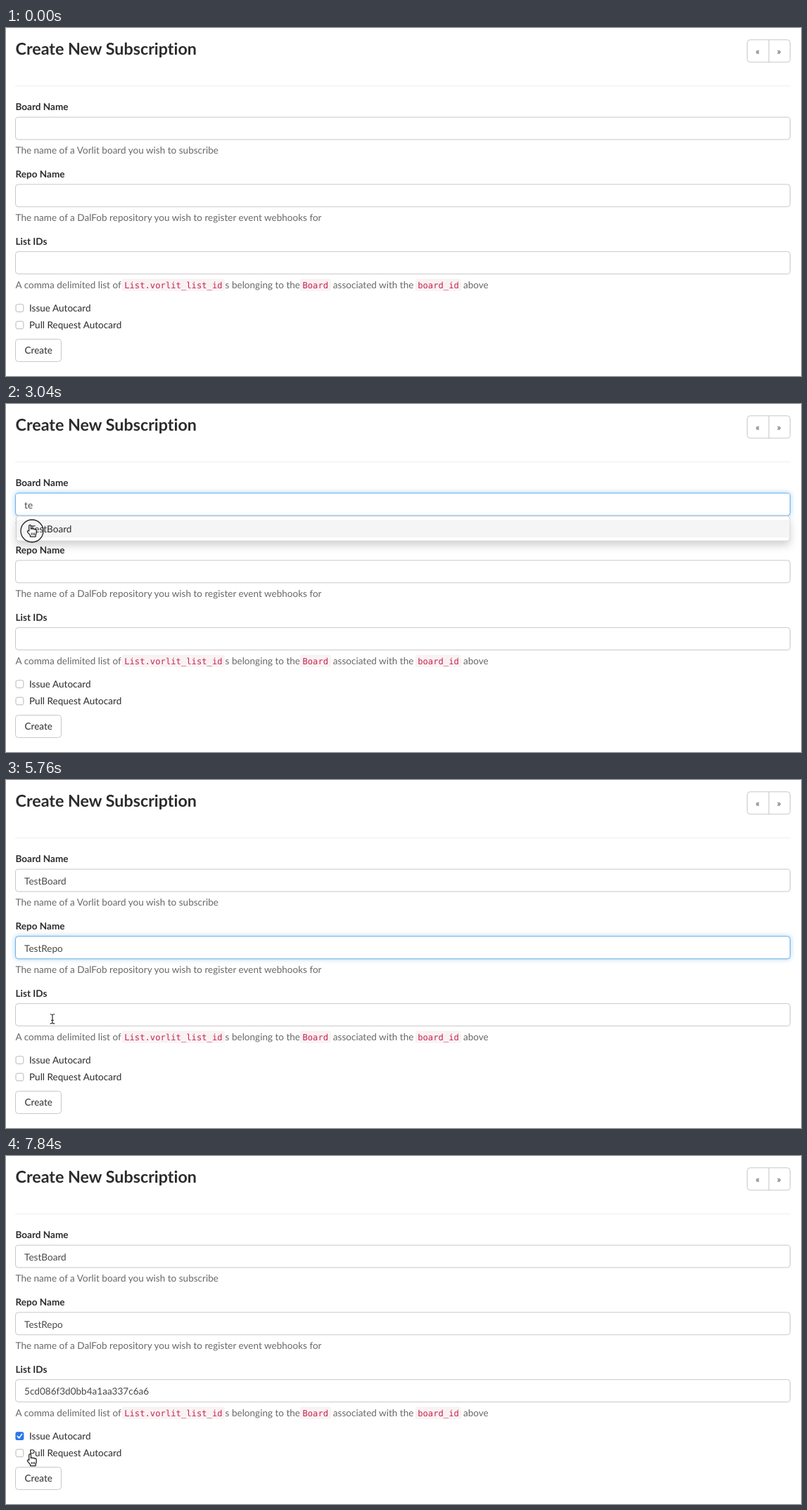
An HTML page for the animation above (8000 ms loop, 1130 by 496 pixels).

```html
<!DOCTYPE html>
<html lang="en">
<head>
<meta charset="utf-8">
<title>Create New Subscription</title>
<style>
  html, body { margin: 0; width: 100%; height: 100%; overflow: hidden; background: #fff; }
  svg { display: block; width: 100vw; height: 100vh; }
  text {
    font: 13.55px Lato, sans-serif; fill: #2c2c2c; white-space: pre;
    text-rendering: geometricPrecision; font-variant-ligatures: none;
  }
  .title { font-size: 23.3px; font-weight: 700; }
  .label { font-weight: 700; }
  .help { fill: #686868; }
  .value, .page { fill: #484848; }
  .page, .button { text-anchor: middle; }
  .code { font: 12.2px "DejaVu Sans Mono", monospace; fill: #c7254e; }
  .suggestion { font: 600 12.4px Inter, sans-serif; fill: #ececec; }
  .box { fill: #fff; stroke: #c6c6c6; stroke-width: .97; }
  .focused { stroke: #66afe9; }
</style>
</head>
<body>
<svg id="stage" viewBox="0 0 1130 496" xmlns="http://www.w3.org/2000/svg"></svg>
<script>
const LOOP = 8000, STEP = 160;
const LEFT = 13.5, WIDTH = 1101, TEXT_X = 26.1;
const FIELD_H = 31.9, FIELD_GAP = 95.8;
const LIST_ID = "5cd086f3d0bb4a1aa337c6a6";

const fieldY = i => 127.1 + i * FIELD_GAP;
const text = (cls, x, y, s, id = "") =>
  `<text class="${cls}" x="${x}" y="${y}" ${id && `id="${id}"`}>${s}</text>`;
const box = (x, y, w, h, r = 4, id = "") =>
  `<rect class="box" x="${x}" y="${y}" width="${w}" height="${h}" rx="${r}" ${id && `id="${id}"`}/>`;
const code = (x, w, s) =>
  `<rect x="${x}" y="357.2" width="${w}" height="17.6" rx="3.9" fill="#f9f2f4"/>` +
  text("code", x + 3.6, 370.6, s);

const fields = [
  { label: "Board Name", help: "The name of a Vorlit board you wish to subscribe" },
  { label: "Repo Name", help: "The name of a DalFob repository you wish to register event webhooks for" },
  { label: "List IDs", help: "A comma delimited list of" }
];

function fieldMarkup({ label, help }, i) {
  const y = fieldY(i);
  return `<rect id="glow${i}" x="13" y="${y - .5}" width="1102" height="32.9" rx="4"
      fill="#66afe9" fill-opacity=".6" filter="url(#glow)"/>` +
    text("label", LEFT, y - 9.9, label) +
    box(LEFT, y, WIDTH, FIELD_H, 4, "field" + i) +
    text("value", TEXT_X, y + 21.6, "", "value" + i) +
    text("help", LEFT, y + 51.8, help);
}

const checkbox = (y, label) =>
  `<rect x="14" y="${y}" width="10.8" height="10.8" rx="2.4" fill="#fff" stroke="#b8b8b8"/>` +
  text("", 33, y + 10.4, label);

const menu = (i, item) => `<g id="menu${i}" transform="translate(0 ${i * FIELD_GAP})">
  <rect x="14.5" y="159.8" width="1099.5" height="35.4" rx="3.5" fill="#fff"
    stroke="#ccc" stroke-width=".97" filter="url(#menuShadow)"/>
  <rect x="15" y="165" width="1098.5" height="25.4" fill="#f5f5f5"/>
  ${text("", 33.9, 182.8, item)}</g>`;

const beam = "M-3.3-6.8q2.6 0 3.3 1.3q.7-1.3 3.3-1.3M0-5.5V5.5M-3.3 6.8q2.6 0 3.3-1.3q.7 1.3 3.3 1.3M-1.9 2h3.8";
const hand = "M-4-6.5c0-2 2.6-2 2.6 0v4c.2-1.2 2.4-1.2 2.6.2 .5-1 2.3-.8 2.5.5 .6-.8 2-.5 2 1v3" +
  "c0 1.5-1 2.5-1 4V7.5h-7V6c-1-1.5-2.6-3-3.6-4.6-.8-1.3.8-2.6 2-1.4z";

const stage = document.getElementById("stage");
stage.innerHTML = `
<defs>
  <filter id="glow" x="-2%" y="-60%" width="104%" height="220%"><feGaussianBlur stdDeviation="3.9"/></filter>
  <filter id="menuShadow" x="-3%" y="-60%" width="106%" height="260%">
    <feDropShadow dx="0" dy="5.8" stdDeviation="5.8" flood-opacity=".175"/></filter>
  <filter id="popupShadow" x="-5%" y="-20%" width="110%" height="150%">
    <feDropShadow dx="0" dy="1" stdDeviation="1.4" flood-opacity=".45"/></filter>
</defs>
<rect width="1130" height="496" fill="#fff"/>
${text("title", LEFT, 37.7, "Create New Subscription")}
${box(1053.5, 16.8, 61, 31.9)}
<path d="M1084.3 17V48.5" stroke="#c6c6c6" stroke-width=".97"/>
${text("page", 1068.5, 37.5, "«")}${text("page", 1098.7, 37.5, "»")}
<path d="M13 82.5H1115" stroke="#eee"/>
${fields.map(fieldMarkup).join("")}
${code(164.6, 146.8, "List.vorlit_list_id")}
${text("help", 311.6, 370.7, "s belonging to the")}
${code(417.8, 44, "Board")}
${text("help", 464.8, 370.7, "associated with the")}
${code(581.6, 65.8, "board_id")}
${text("help", 650, 370.7, "above")}
${checkbox(393.8, "Issue Autocard")}
${checkbox(418, "Pull Request Autocard")}
<g id="check">
  <rect x="13.5" y="393.3" width="11.8" height="11.8" rx="2.6" fill="#2878ee"/>
  <path d="M16.3 399.4l2.3 2.6 4-5.6" fill="none" stroke="#fff" stroke-width="1.6"
    stroke-linecap="round" stroke-linejoin="round"/>
</g>
${box(LEFT, 443.5, 65, 31.9)}
${text("button", 46.2, 464, "Create")}
<path id="caret" d="M0-16.5V0" stroke="#333"/>
${menu(0, "TestBoard")}${menu(1, "TestRepo")}
<g id="popup">
  <rect x="13.5" y="352" width="231.5" height="50.5" rx="3" fill="#25272a" filter="url(#popupShadow)"/>
  ${text("suggestion", 25.5, 382, LIST_ID)}
</g>
<g id="cursor" fill="none">
  <circle id="ring" r="16" stroke="#222" stroke-width="1.3"/>
  <g id="beam"><path d="${beam}" stroke="#fff" stroke-width="2.6" stroke-opacity=".8"/>
    <path d="${beam}" stroke="#222" stroke-width="1.15"/></g>
  <g id="hand" transform="scale(1.08)">
    <path d="${hand}" fill="#fff" stroke="#222" stroke-width="1.2" stroke-linejoin="round"/>
    <path d="M-.5 2.4v3M1.5 2.4v3M3.3 2.4v3" stroke="#222" stroke-width=".9"/></g>
</g>`;

const $ = id => document.getElementById(id);
const show = (id, on) => $(id).setAttribute("visibility", on ? "visible" : "hidden");
const within = (t, ...spans) => spans.some(([a, b]) => t >= a && t < b);

// [time, x, y]
const path = [
  [160, 89, 188], [800, 39, 136], [960, 39, 136], [1120, 31, 139.5],
  [2400, 31, 139.5], [2880, 37, 181], [3200, 37, 181], [3840, 46, 250.3],
  [4480, 46, 250.3], [4800, 50, 274], [5120, 50, 274], [5760, 66, 340.5],
  [6720, 66, 340.5], [7200, 38, 404], [7520, 38, 404], [7840, 37, 433.5]
];

// [time, text]
const typing = [
  [[1920, "t"], [2240, "te"], [3200, "TestBoard"]],
  [[4160, "te"], [4320, "tes"], [5120, "TestRepo"]],
  [[6560, LIST_ID]]
];

const focusSpans = [[1280, 3840], [3840, 6080], [6080, 7360]];

function cursorAt(t) {
  const n = path.findIndex(p => p[0] > t);
  if (n < 0) return path[path.length - 1].slice(1);
  if (n === 0) return path[0].slice(1);
  const [t0, x0, y0] = path[n - 1], [t1, x1, y1] = path[n];
  const u = (t - t0) / (t1 - t0), e = u * u * (3 - 2 * u);
  return [x0 + (x1 - x0) * e, y0 + (y1 - y0) * e];
}

function render(now) {
  const t = Math.floor((now % LOOP) / STEP) * STEP;

  typing.forEach((keys, i) => {
    const value = keys.reduce((s, [at, v]) => t >= at ? v : s, "");
    const focused = within(t, focusSpans[i]);
    $("value" + i).textContent = value;
    $("field" + i).classList.toggle("focused", focused);
    show("glow" + i, focused);
    if (focused) {
      const x = TEXT_X + .4 + (value ? $("value" + i).getComputedTextLength() : 0);
      $("caret").setAttribute("transform", `translate(${x} ${fieldY(i) + 24.9})`);
    }
  });

  show("caret", within(t, [1440, 1760], [1920, 2560], [3840, 4640], [6080, 6400]));
  show("menu0", within(t, [2400, 3200]));
  show("menu1", within(t, [4480, 5120]));
  show("popup", within(t, [6080, 6560]));
  show("check", t >= 7520);

  const [x, y] = cursorAt(t);
  const visible = t >= 160;
  const pointing = within(t, [2720, 3200], [4640, 5120], [7200, LOOP]);
  $("cursor").setAttribute("transform", `translate(${x} ${y})`);
  show("beam", visible && !pointing);
  show("hand", visible && pointing);
  show("ring", within(t, [1120, 1440], [3040, 3200], [4960, 5120], [5920, 6080], [7360, 7680]));
}

const start = performance.now();
function tick() {
  render(performance.now() - start);
  requestAnimationFrame(tick);
}
tick();
</script>
</body>
</html>
```
